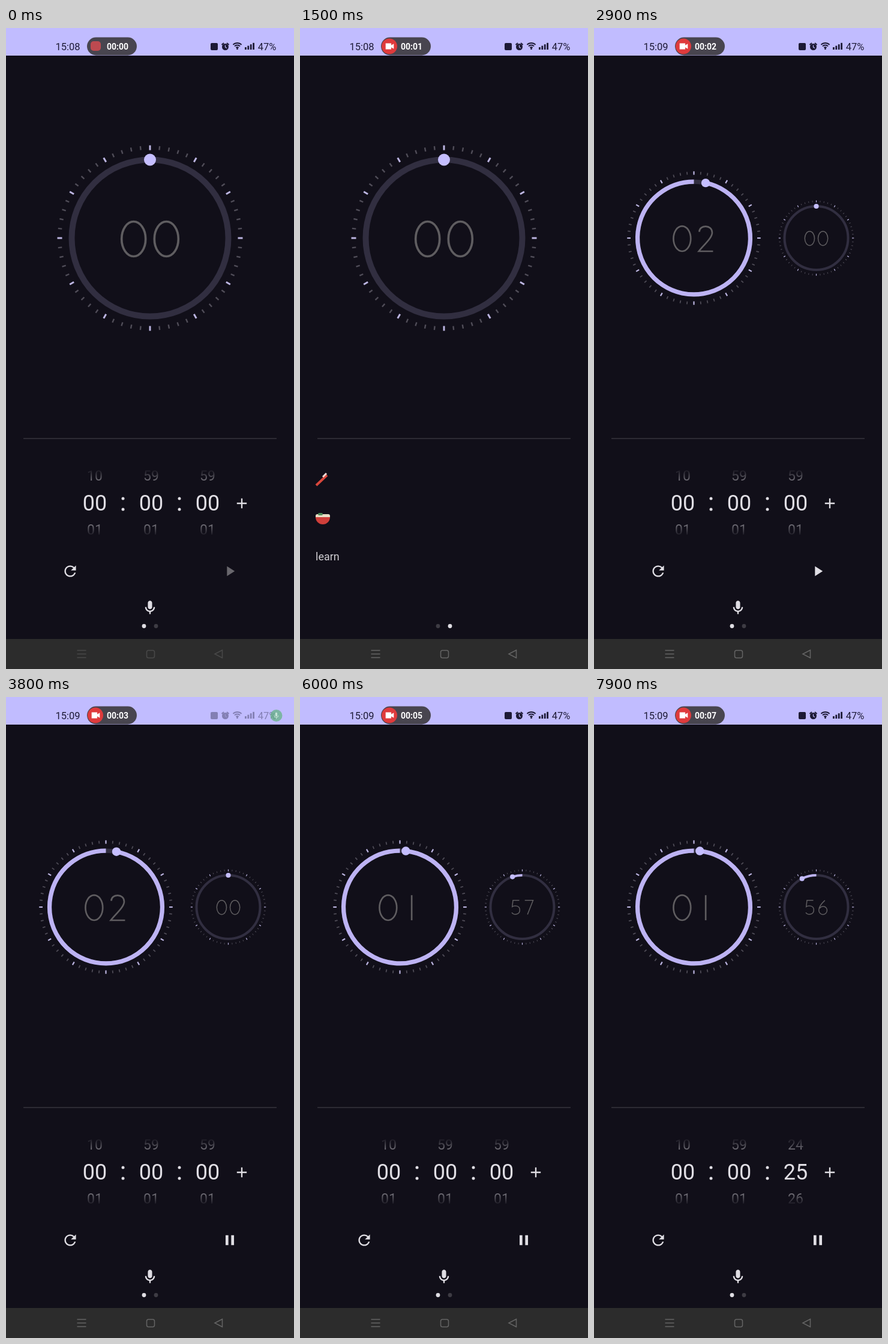
Animation of 480 by 1068 pixels, one loop 8 s. Source, as an HTML page with a canvas:

```html
<!DOCTYPE html>
<html lang="en">
<head>
<meta charset="utf-8">
<title>Voice timer</title>
<style>
  html, body { margin: 0; width: 100%; height: 100%; overflow: hidden; background: #110f19; }
  canvas { display: block; width: 480px; height: 1068px; }
</style>
</head>
<body>
<canvas id="stage" width="480" height="1068"></canvas>
<script>
const ctx = document.getElementById('stage').getContext('2d');
const LOOP = 8000;
const ACCENT = '#c5beff', LIGHT = '#e0dee4', INK = '#1d1a35';
const WHEEL_Y = 791, ROW = 45;

const clamp = v => Math.min(1, Math.max(0, v));
const span = (t, from, length) => clamp((t - from) / length);
const easeQuad = p => p < .5 ? 2 * p * p : 1 - 2 * (1 - p) ** 2;
const easeCubic = p => p < .5 ? 4 * p ** 3 : 1 - 4 * (1 - p) ** 3;
const mix = (a, b, p) => a + (b - a) * p;
const pad = n => String(n).padStart(2, '0');

// 24-unit icons
const ICONS = {
  reset: 'M17.65 6.35A7.96 7.96 0 0 0 12 4c-4.42 0-8 3.58-8 8s3.58 8 8 8c3.73 0 6.84-2.55 7.73-6h-2.08A6 6 0 0 1 12 18c-3.31 0-6-2.69-6-6s2.69-6 6-6c1.66 0 3.14.69 4.22 1.78L13 11h7V4z',
  play: 'M8 5v14l11-7z',
  pause: 'M6 5h4v14H6zM14 5h4v14h-4z',
  plus: 'M19 13h-6v6h-2v-6H5v-2h6V5h2v6h6z',
  mic: 'M12 14c1.66 0 3-1.34 3-3V5c0-1.66-1.34-3-3-3S9 3.34 9 5v6c0 1.66 1.34 3 3 3zM17 11c0 2.76-2.24 5-5 5s-5-2.24-5-5H5c0 3.53 2.61 6.43 6 6.92V21h2v-3.08c3.39-.49 6-3.39 6-6.92z',
  camera: 'M4 6h11v4l5-3v10l-5-3v4H4z'
};
for (const name in ICONS) ICONS[name] = new Path2D(ICONS[name]);

// Thin dial numerals, 40 x 58 around the origin
const NUMERALS = {
  0: 'M0-29A20 29 0 0 1 0 29A20 29 0 0 1 0-29',
  1: 'M0-29V29',
  2: 'M-15-16C-14-33 15-33 15-14C15-2-4 14-16 29H17',
  5: 'M15-29H-11L-14-3C-4-10 17-7 17 10C17 29-6 34-16 21',
  6: 'M8-29C-4-18-17-4-17 11A17 18 0 0 0 17 11A17 18 0 0 0-14 4',
  7: 'M-17-29H17L-6 29',
  8: 'M0-29A14 13 0 0 1 0-3A14 13 0 0 1 0-29M0-3A17 16 0 0 1 0 29A17 16 0 0 1 0-3',
  9: 'M-8 29C4 18 17 4 17-11A17 18 0 0 0-17-11A17 18 0 0 0 14-4'
};
for (const n in NUMERALS) NUMERALS[n] = new Path2D(NUMERALS[n]);

function rect(x, y, w, h, color, radius = 0) {
  ctx.fillStyle = color;
  ctx.beginPath();
  ctx.roundRect(x, y, w, h, radius);
  ctx.fill();
}

function disc(x, y, r, color) {
  ctx.fillStyle = color;
  ctx.beginPath();
  ctx.arc(x, y, r, 0, 7);
  ctx.fill();
}

function line(color, width, ...points) {
  ctx.strokeStyle = color;
  ctx.lineWidth = width;
  ctx.beginPath();
  for (let i = 0; i < points.length; i += 2) ctx.lineTo(points[i], points[i + 1]);
  ctx.stroke();
}

function arc(x, y, r, from, to, color, width) {
  ctx.strokeStyle = color;
  ctx.lineWidth = width;
  ctx.beginPath();
  ctx.arc(x, y, r, from, to);
  ctx.stroke();
}

function text(str, x, y, size, color, align = 'center', weight = 400) {
  ctx.font = `${weight} ${size}px Roboto, sans-serif`;
  ctx.textAlign = align;
  ctx.fillStyle = color;
  ctx.fillText(str, x, y + size * .356);
}

function icon(name, x, y, scale, color) {
  ctx.save();
  ctx.translate(x, y);
  ctx.scale(scale, scale);
  ctx.translate(-12, -12);
  ctx.fillStyle = color;
  ctx.fill(ICONS[name]);
  ctx.restore();
}

function dial(x, scale, degrees, value) {
  const radius = 130.5, top = -Math.PI / 2, angle = top - degrees * Math.PI / 180;
  ctx.save();
  ctx.translate(x, 350);
  ctx.scale(scale, scale);
  for (let i = 0; i < 60; i++) {
    const major = i % 5 === 0;
    line(major ? '#bdb6e2' : '#504d58', major ? 3 : 2.4, 0, major ? -146.5 : -147.5, 0, major ? -154.5 : -154);
    ctx.rotate(Math.PI / 30);
  }
  arc(0, 0, radius, 0, 7, '#312e40', 10);
  if (degrees > 0) arc(0, 0, radius, angle, top, '#bdb3f3', 10);
  disc(radius * Math.cos(angle), radius * Math.sin(angle), 10, ACCENT);
  [...pad(value)].forEach((n, i) => {
    ctx.save();
    ctx.translate(i ? 27.3 : -27.3, 1.5);
    ctx.strokeStyle = '#5f5d60';
    ctx.lineWidth = 3.7;
    ctx.stroke(NUMERALS[n]);
    ctx.restore();
  });
  ctx.restore();
}

function dials(t) {
  const split = t >= 2400 ? easeQuad(span(t, 2400, 500)) : 0;
  const sweep = easeCubic(span(t, 2400, 500));
  const ticking = Math.max(0, (t - 3815) / 1000);
  const whole = Math.floor(ticking);
  const runDegrees = 6 * (whole + easeQuad(clamp((ticking - whole) * 1000 / 180)));
  const ticks = Math.max(0, Math.floor((t - 3965) / 1000) + 1);
  if (split > 0) {
    const minuteStep = 6 * easeQuad(span(t, 3742, 180));
    dial(mix(58.3, 166.5, split), .72 * split, 348 * sweep + minuteStep, ticks ? 1 : 2);
  }
  const secondDegrees = t < 3815 ? 360 * sweep % 360 : runDegrees;
  dial(mix(240, 370.5, split), mix(1, .406, split), secondDegrees, (60 - ticks) % 60);
}

function wheel(x, position, count) {
  const fade = ctx.createLinearGradient(0, 735, 0, 847);
  [[0, 0], [.38, 1], [.62, 1], [1, 0]].forEach(([at, alpha]) =>
    fade.addColorStop(at, `rgba(224,222,228,${alpha})`));
  const selected = Math.round(position);
  for (let i = selected - 1; i <= selected + 1; i++) {
    const label = pad((i + count) % count);
    text(label, x, WHEEL_Y + (i - position) * ROW, i === selected ? 36 : 23, fade);
  }
}

function timerPage(t) {
  const seconds = 25 * (1 - (1 - span(t, 6000, 1200)) ** 3.14);
  wheel(148, 0, 11);
  wheel(242, 0, 60);
  wheel(336, seconds, 60);
  for (const x of [195, 289]) {
    disc(x, 784, 2.5, LIGHT);
    disc(x, 802, 2.5, LIGHT);
  }
  icon('plus', 393, 792, 1.17, LIGHT);
  icon('reset', 107, 905, 1.2, LIGHT);
  icon(t < 2960 ? 'play' : 'pause', 373, 905, 1.17, t < 2400 ? '#69676d' : LIGHT);
  icon('mic', 240, 966, 1.18, LIGHT);
}

function presetPage() {
  line('#d9473c', 4, 27, 762, 45, 745);
  line('#f0d9d4', 3, 38, 748, 44, 742);
  rect(26, 810, 24, 7, '#e9dfc6', 3);
  rect(30, 808, 8, 4, '#4c8a58', 2);
  ctx.fillStyle = '#cf3f3a';
  ctx.beginPath();
  ctx.arc(38, 815, 12, 0, Math.PI);
  ctx.fill();
  text('learn', 26, 881, 18, '#cfcdd2', 'left');
}

function pages(t) {
  const offset = t < 2400 ? 480 * easeQuad(span(t, 750, 678)) : 0;
  ctx.save();
  ctx.translate(-offset, 0);
  timerPage(t);
  ctx.translate(480, 0);
  if (offset > 0) presetPage();
  ctx.restore();
  const second = offset > 240;
  disc(230, 996.5, 3.4, second ? '#3e3c44' : LIGHT);
  disc(250, 996.5, 3.4, second ? LIGHT : '#3e3c44');
  if (t >= 700 && t < 1050) disc(413.5 - offset, 884.5, 10.5, '#a09ea4');
}

function statusIcons() {
  rect(341, 25, 12, 12, INK, 2);
  disc(365.5, 31.5, 5.5, INK);
  line(INK, 2, 359.5, 28, 363, 25);
  line(INK, 2, 368, 25, 371.5, 28);
  line('#c1bcff', 1.2, 365.5, 28.5, 365.5, 32, 368, 33.5);
  for (const r of [3, 6.5, 10]) arc(385.5, 35, r, -2.36, -.78, INK, 1.8);
  disc(385.5, 34.5, 1.5, INK);
  for (let i = 0; i < 4; i++) rect(398 + i * 4.4, 32 - i * 2.4, 2.8, 4 + i * 2.4, INK);
  text('47%', 435, 31, 16.5, INK);
}

function statusBar(t) {
  rect(0, 0, 480, 46, '#c1bcff');
  text(t < 1600 ? '15:08' : '15:09', 103, 31, 16.5, INK);
  rect(135, 15.5, 83, 30, '#48454f', 15);
  if (t < 100) {
    rect(141, 22, 17, 16, '#bd4a50', 5);
  } else {
    disc(149, 30.5, 13, '#df3a3c');
    icon('camera', 149.5, 30.5, .85, '#fff');
  }
  text('00:' + pad(Math.max(0, Math.floor((t - 100) / 1000))), 186, 31, 14, '#fff', 'center', 700);

  const listening = span(t, 3750, 80) - span(t, 5900, 100);
  ctx.globalAlpha = 1 - listening;
  statusIcons();
  ctx.globalAlpha = listening;
  disc(450.5, 31, 10, '#51b06c');
  icon('mic', 450.5, 31.3, .55, '#f2fff5');
  ctx.globalAlpha = 1;
}

function navigationBar(t) {
  const color = t < 100 ? '#484848' : '#646464';
  rect(0, 1018, 480, 50, '#2c2c2c');
  for (const y of [1037, 1043, 1049]) line(color, 1.5, 118.5, y, 133.5, y);
  ctx.lineWidth = 1.5;
  ctx.beginPath();
  ctx.roundRect(234.5, 1037, 13, 12.5, 3);
  ctx.moveTo(348, 1043);
  ctx.lineTo(360.5, 1036.5);
  ctx.lineTo(360.5, 1049.5);
  ctx.closePath();
  ctx.stroke();
}

function draw(now) {
  const t = now % LOOP;
  rect(0, 0, 480, 1068, '#110f19');
  dials(t);
  line('#2d2b34', 2, 29, 684, 451, 684);
  pages(t);
  statusBar(t);
  navigationBar(t);
}

let start;
function frame(now) {
  start ??= now;
  draw(now - start);
  requestAnimationFrame(frame);
}
requestAnimationFrame(frame);
</script>
</body>
</html>
```
